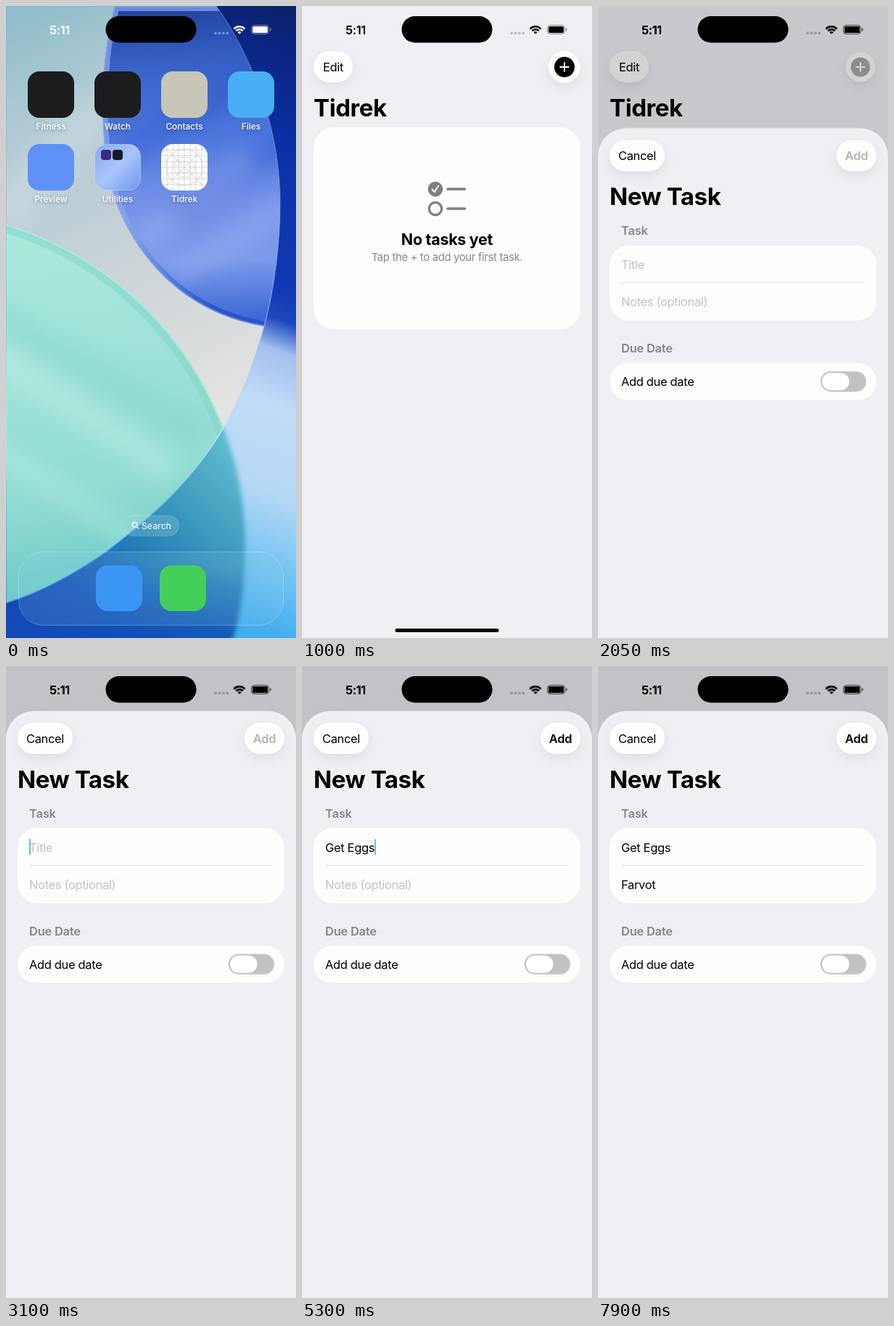
Recreate the animation shown at these times as an HTML page with a canvas. Size 400x870 px, loop 8 s.

```html
<!DOCTYPE html>
<html lang="en">
<head>
<meta charset="utf-8">
<title>Task app</title>
<style>
  html, body { margin: 0; width: 100%; height: 100%; overflow: hidden; background: #f0eff4; }
  canvas { display: block; width: 400px; height: 870px; }
</style>
</head>
<body>
<canvas id="stage"></canvas>
<script>
const W = 400, H = 870, LOOP = 8000, STEP = 50;
const APP = 'Tidrek';
const dpr = window.devicePixelRatio || 1;
const stage = document.getElementById('stage');
let c;

const clamp = v => Math.max(0, Math.min(1, v));
const lerp = (a, b, p) => a + (b - a) * p;

// Critically damped spring, settled from `end` on.
function spring(t, start, end, stiffness) {
  if (t <= start) return 0;
  if (t >= end) return 1;
  const x = (t - start) / 1000 * stiffness;
  return 1 - (1 + x) * Math.exp(-x);
}

function setup(canvas) {
  canvas.width = W * dpr;
  canvas.height = H * dpr;
  const ctx = canvas.getContext('2d');
  ctx.scale(dpr, dpr);
  return ctx;
}

function layer(draw) {
  const canvas = document.createElement('canvas');
  c = setup(canvas);
  draw();
  return canvas;
}

function group(draw) {
  c.save();
  draw();
  c.restore();
}

function box(x, y, w, h, r, fill, stroke) {
  c.beginPath();
  c.roundRect(x, y, w, h, r);
  if (fill) { c.fillStyle = fill; c.fill(); }
  if (stroke) { c.strokeStyle = stroke; c.stroke(); }
}

function disc(x, y, r, fill) {
  c.beginPath();
  c.arc(x, y, r, 0, 7);
  c.fillStyle = fill;
  c.fill();
}

function rim(x, y, r, color, width) {
  c.beginPath();
  c.arc(x, y, r - width / 2, 0, 7);
  c.strokeStyle = color;
  c.lineWidth = width;
  c.stroke();
}

function line(points, color, width) {
  c.beginPath();
  points.forEach(([x, y]) => c.lineTo(x, y));
  c.strokeStyle = color;
  c.lineWidth = width;
  c.stroke();
}

function strokePath(path, color, width) {
  c.strokeStyle = color;
  c.lineWidth = width;
  c.stroke(path);
}

function font(size, weight = 400, track = -0.021) {
  c.font = `${weight} ${size}px Inter, "Liberation Sans", sans-serif`;
  c.letterSpacing = size * track + 'px';
}

function text(s, x, y, size, color, { weight, track, align = 'left' } = {}) {
  font(size, weight, track);
  c.textAlign = align;
  c.fillStyle = color;
  c.fillText(s, x, y);
}

function gradient(x0, y0, x1, y1, ...colors) {
  const g = c.createLinearGradient(x0, y0, x1, y1);
  colors.forEach((color, i) => Array.isArray(color)
    ? g.addColorStop(color[0], color[1])
    : g.addColorStop(i / (colors.length - 1), color));
  return g;
}

function fillStage(fill) {
  c.fillStyle = fill;
  c.fillRect(0, 0, W, H);
}

// ---- Home screen ----

function streak(x0, y0, x1, y1, color, width) {
  group(() => {
    c.filter = `blur(${width * 0.4 * dpr}px)`;
    line([[x0, y0], [x1, y1]], color, width);
  });
}

function drawWallpaper() {
  fillStage(gradient(390, 0, 104, 766, '#0a2068', [.07, '#0a2580'], [.23, '#0c31a6'], [.45, '#1239b4'],
    [.5, '#1d48bd'], [.55, '#a3c0ee'], [.64, '#c3dbf7'], [.78, '#b4d8f6'], [.9, '#72c4f2'], [1, '#42aeee']));

  const mint = [-135, 745, 465];
  group(() => {
    c.filter = `blur(${3 * dpr}px)`;
    disc(...mint, gradient(330, 590, 40, 880, '#68c3d5', [.28, '#429fbf'], [.5, '#2582b8'],
      [.75, '#1858bb'], [1, '#1a46b4']));
    disc(...mint, gradient(0, 770, 0, H, 'rgba(16,76,184,0)', 'rgba(16,76,184,.75)'));
  });

  const lens = new Path2D('M290 0C340 70 378 170 378 270C378 390 345 505 299 582C250 665 185 715 140 750C90 785 45 808 0 822V0Z');
  group(() => {
    c.clip(lens);
    fillStage(gradient(20, 0, 290, 560, '#8fbdcb', [.25, '#b0cbd4'], [.55, '#c6d1d6'], [1, '#e4e3e1']));
    streak(-20, 300, 140, 130, 'rgba(225,232,235,.35)', 50);

    const petal = new Path2D('M150 0C125 90 128 225 160 290C195 365 260 425 357 441L420 445V0Z');
    group(() => {
      c.clip(petal);
      fillStage(gradient(250, 0, 270, 430, '#20439f', [.2, '#3a64ca'], [.42, '#4f78de'],
        [.62, '#7592e8'], [.82, '#7b9aea'], [1, '#3f69d6']));
      streak(150, 210, 400, 60, 'rgba(30,70,190,.25)', 40);
      streak(230, 290, 400, 180, 'rgba(40,80,200,.4)', 34);
      streak(180, 330, 340, 210, 'rgba(170,190,245,.35)', 36);
      streak(230, 370, 390, 280, 'rgba(160,185,245,.35)', 34);
      strokePath(petal, gradient(170, 290, 290, 410, 'rgba(140,168,238,.7)', 'rgba(36,80,200,.85)'), 14);
      strokePath(petal, 'rgba(140,172,245,.6)', 3);
    });

    disc(...mint, gradient(60, 310, 140, 810, '#a9e9da', [.35, '#a0e2d7'], [.7, '#93ddd2'], [1, '#6bc9c9']));
    group(() => {
      c.beginPath();
      c.arc(...mint, 0, 7);
      c.clip();
      streak(-20, 480, 230, 640, 'rgba(205,245,235,.35)', 40);
      streak(-20, 610, 190, 740, 'rgba(195,240,230,.3)', 34);
      streak(-20, 420, 270, 590, 'rgba(120,205,195,.3)', 36);
      rim(...mint, 'rgba(130,214,200,.5)', 12);
      rim(...mint, 'rgba(190,240,228,.7)', 2);
    });
  });
  strokePath(lens, gradient(0, 0, 0, H, 'rgba(90,140,230,.3)', [.5, 'rgba(140,180,250,.7)'],
    [.68, '#c5ecf8'], [.8, '#58b4f4'], [1, '#2a66d8']), 1.4);
}

function drawTemplateIcon(x, y) {
  box(x, y, 64, 64, 16, '#fdfdfd');
  group(() => {
    c.clip();
    c.translate(x + 32, y + 32);
    c.strokeStyle = '#c9c9cb';
    c.lineWidth = 0.7;
    c.beginPath();
    for (const d of [-24, -16, -8, 0, 8, 16, 24]) {
      c.moveTo(d, -32); c.lineTo(d, 32);
      c.moveTo(-32, d); c.lineTo(32, d);
    }
    c.moveTo(-32, -32); c.lineTo(32, 32);
    c.moveTo(32, -32); c.lineTo(-32, 32);
    for (const r of [8, 14, 25]) { c.moveTo(r, 0); c.arc(0, 0, r, 0, 7); }
    c.stroke();
  });
}

function drawHomeItems(withApp) {
  const icon = (x, y, color) => box(x, y, 64, 64, 16, color);
  icon(30, 90, '#1c1c1e');
  icon(122, 90, '#1c1c1e');
  icon(214, 90, '#c8c6b8');
  icon(306, 90, '#49aef3');
  icon(30, 190, '#5f90f6');

  c.lineWidth = 1;
  box(122.5, 190.5, 63, 63, 16, gradient(122, 190, 186, 254, '#86a9f2', '#a9c4fa', '#6f95ee'), 'rgba(200,220,255,.55)');
  box(131, 198, 14, 14, 4, '#3a2a78');
  box(147, 198, 14, 14, 4, '#151a26');
  if (withApp) drawTemplateIcon(214, 190);

  group(() => {
    c.shadowColor = 'rgba(0,0,0,.35)';
    c.shadowBlur = 4 * dpr;
    c.shadowOffsetY = dpr;
    const rows = [['Fitness', 'Watch', 'Contacts', 'Files'], ['Preview', 'Utilities', withApp ? APP : '']];
    rows.forEach((row, j) => row.forEach((label, i) =>
      text(label, 62 + 92 * i, 170 + 100 * j, 11.8, '#fff', { weight: 500, track: 0.005, align: 'center' })));
  });

  c.lineWidth = 1;
  box(162.5, 701.5, 76, 28, 14, 'rgba(160,205,212,.3)', 'rgba(255,255,255,.15)');
  const searchInk = 'rgba(255,255,255,.85)';
  rim(177.5, 714, 4, searchInk, 1.4);
  line([[180, 716.5], [183, 719.5]], searchInk, 1.4);
  text('Search', 187, 719.5, 12.2, searchInk, { weight: 500, track: 0 });

  c.lineWidth = 1;
  box(17.5, 751.5, 365, 101, 34, 'rgba(150,205,230,.16)', 'rgba(255,255,255,.25)');
  box(124, 770, 64, 63, 16, '#3a96f2');
  box(212, 770, 64, 63, 16, '#43cf59');
}

// ---- Shared chrome ----

function drawStatus(color, dots) {
  text('5:11', 74, 38.5, 16.5, color, { weight: 600, align: 'center' });
  for (let i = 0; i < 4; i++) disc(289 + 5.4 * i, 37.3, 1.9, dots);
  c.strokeStyle = color;
  for (const [r, w] of [[10.3, 2.5], [6.4, 2.4], [1.7, 3.4]]) {
    c.beginPath();
    c.arc(322, 38.6, r, -Math.PI * 0.76, -Math.PI * 0.24);
    c.lineWidth = w;
    c.stroke();
  }
  group(() => {
    c.globalAlpha *= 0.45;
    c.lineWidth = 1;
    box(338.5, 26.5, 24, 12, 4, null, color);
    box(364, 30.5, 1.4, 4, 0.7, color);
  });
  box(340, 28, 21, 9, 2.6, color);
}

const drawIsland = () => box(137.5, 14, 125, 36.5, 18.3, '#000');

function pill(x, y, w, h, fill) {
  group(() => {
    c.shadowColor = 'rgba(0,0,0,.07)';
    c.shadowBlur = 16 * dpr;
    c.shadowOffsetY = 6 * dpr;
    box(x, y, w, h, h / 2, fill);
  });
}

// ---- App ----

const bold = { weight: 700, track: -0.012 };

function drawApp(pressed) {
  fillStage('#f0eff4');
  drawStatus('#000', '#bcbcc0');

  pill(16, 62, 54, 43, '#fdfdfd');
  text('Edit', 43, 90, 16.5, '#000', { align: 'center' });
  const r = pressed ? 20.5 : 22;
  pill(362 - r, 84 - r, 2 * r, 2 * r, '#fdfdfd');
  disc(362, 84, pressed ? 13.3 : 14, pressed ? '#a9a9ac' : '#000');
  line([[355.5, 84], [368.5, 84]], '#fff', 2);
  line([[362, 77.5], [362, 90.5]], '#fff', 2);

  text(APP, 16, 151.5, 33, '#000', bold);
  box(16, 167, 368, 278, 28, '#fdfdfd');

  const gray = '#7f7f80';
  c.lineCap = 'round';
  disc(184, 252, 10.3, gray);
  line([[179.5, 252.5], [182.8, 256], [188.3, 247.5]], '#fff', 2);
  rim(184, 279, 10.3, gray, 3.3);
  for (const y of [252, 279]) line([[201, y], [224.5, y]], gray, 3.6);
  c.lineCap = 'butt';

  text('No tasks yet', 200, 328.5, 21.4, '#000', { ...bold, align: 'center' });
  text('Tap the + to add your first task.', 200, 350.5, 14.8, '#88888b', { align: 'center' });
}

// ---- New task sheet ----

const typing = [
  [0, '', ''],
  [4300, 'G', ''], [4400, 'Get', ''], [4450, 'Get ', ''], [4700, 'Get E', ''],
  [4900, 'Get Eg', ''], [4950, 'Get Egg', ''], [5000, 'Get Eggs', ''],
  [6550, 'Get Eggs', 'F'], [6900, 'Get Eggs', ''], [7100, 'Get Eggs', 'Fa'],
  [7200, 'Get Eggs', 'Far'], [7300, 'Get Eggs', 'Farv'], [7550, 'Get Eggs', 'Farvot'],
];

// Caret opacity as [time, value] knots.
const caret = [
  [2700, 0], [2750, 1], [3050, 1], [3300, 0], [3550, 0], [3850, 1], [4050, 1], [4250, 0], [4300, 1],
  [5250, 1], [5450, 0], [5500, 0], [5550, 1], [5800, 1], [5900, 0], [6000, 0], [6100, 1],
  [6300, 1], [6400, 0], [6500, 0], [6550, 1], [7800, 1], [7900, 0],
];

function caretAlpha(t) {
  const next = caret.findIndex(([time]) => time > t);
  if (next < 1) return 0;
  const [t0, a] = caret[next - 1], [t1, b] = caret[next];
  return lerp(a, b, (t - t0) / (t1 - t0));
}

function drawField(value, placeholder, y, caretOpacity) {
  text(value || placeholder, 32, y + 6, 16.5, value ? '#000' : '#c3c3c6');
  if (!caretOpacity) return;
  const x = 32 + c.measureText(value).width;
  group(() => {
    c.globalAlpha = caretOpacity;
    box(x, y - 11.5, 2, 22.5, 1, '#3ea2f7');
  });
}

function drawSheet(t) {
  const [, title, notes] = typing.findLast(([time]) => time <= t);
  const heading = { weight: 600, track: -0.015 };
  box(0, 62, W, H, [38, 38, 0, 0], '#f0eff4');

  pill(16, 78, 76, 43, '#fdfdfd');
  text('Cancel', 54, 106, 16.5, '#000', { align: 'center' });
  pill(329, 78, 55, 43, '#fdfdfd');
  text('Add', 356.5, 106, 16.5, title ? '#000' : '#b4b4b6', { weight: 600, align: 'center' });
  text('New Task', 16, 167.5, 33, '#000', bold);

  text('Task', 32, 209, 16.5, '#85858a', heading);
  box(16, 223, 368, 103.5, 27, '#fdfdfd');
  c.fillStyle = '#e0e0e2';
  c.fillRect(32, 274, 336, 1);
  const alpha = caretAlpha(t), onTitle = t < 5500;
  drawField(title, 'Title', 249.5, onTitle ? alpha : 0);
  drawField(notes, 'Notes (optional)', 300.5, onTitle ? 0 : alpha);

  text('Due Date', 32, 370.5, 16.5, '#85858a', heading);
  box(16, 385, 368, 51, 25.5, '#fdfdfd');
  text('Add due date', 32, 416.5, 16.5, '#000');
  box(307, 396.5, 63, 28, 14, '#c2c2c4');
  box(309, 398.5, 37.5, 24, 12, '#fff');
}

// ---- Scenes ----

const wallpaper = layer(drawWallpaper);
const homeItems = layer(() => drawHomeItems(true));
const homeItemsOpen = layer(() => drawHomeItems(false));

function drawHome(t) {
  const away = clamp((t - 500) / 100);
  const blur = radius => { if (away) c.filter = `blur(${radius * away * dpr}px)`; };
  c.drawImage(wallpaper, 0, 0, W, H);
  group(() => {
    blur(1.5);
    c.drawImage(wallpaper, 0, 0, W, H);
  });
  group(() => {
    const s = lerp(1, 0.987, away);
    c.translate(W / 2, H / 2);
    c.scale(s, s);
    blur(3);
    c.drawImage(t < 550 ? homeItems : homeItemsOpen, -W / 2, -H / 2, W, H);
  });
  if (t >= 500 && t < 550) box(214, 190, 64, 64, 16, 'rgba(0,0,0,.25)');
  fillStage(`rgba(30,30,30,${0.19 * away})`);
}

// The app window grows out of its icon: its centre leads, its pinched top edge trails.
function drawOpening(t, p) {
  const width = lerp(64, W, p), center = lerp(246, W / 2, p ** 0.87);
  const left = center - width / 2, right = center + width / 2;
  const bottom = lerp(254, H, p);
  const top = lerp(190, 0, clamp((p - 0.34) / 0.66));
  const pinch = 40 * p * (1 - p);
  const r = 16 + 46 * Math.sin(Math.PI * p), rTop = r * 0.85;
  const scale = width / W;
  group(() => {
    c.beginPath();
    c.moveTo(center, top);
    c.arcTo(right - pinch, top, right, bottom, rTop);
    c.arcTo(right, bottom, left, bottom, r);
    c.arcTo(left, bottom, left + pinch, top, r);
    c.arcTo(left + pinch, top, right, top, rTop);
    c.closePath();
    c.clip();
    fillStage('#f0eff4');
    group(() => {
      c.translate(left, top - 8 * (1 - p));
      c.scale(scale, scale);
      drawApp(false);
    });
    const barWidth = 143 * scale;
    box(center - barWidth / 2, bottom - 13 * scale, barWidth, 5 * scale, 3, p < 0.6 ? '#c4c4c8' : '#000');
    if (t < 600) {
      c.globalAlpha = 0.6;
      c.translate(left, top);
      c.scale(width / 64, (bottom - top) / 64);
      drawTemplateIcon(0, 0);
    }
  });
}

function render(t) {
  c.clearRect(0, 0, W, H);
  const open = spring(t, 510, 1000, 13.65);
  if (open < 1) {
    drawHome(t);
    if (open > 0) drawOpening(t, open);
    group(() => {
      c.globalAlpha = clamp((0.9 - open) / 0.4);
      drawStatus('#fff', t < 550 ? '#6d92dc' : '#8d9ec4');
    });
    drawIsland();
    return;
  }

  drawApp(t >= 1800);
  const barAlpha = clamp((1450 - t) / 150);
  if (barAlpha) box(128.5, 857, 143, 5, 2.5, `rgba(0,0,0,${barAlpha})`);

  const rise = spring(t, 1810, 2350, 14.75);
  if (rise) {
    fillStage(`rgba(0,0,0,${0.19 * rise})`);
    group(() => {
      c.translate(0, (1 - rise) * (H - 62));
      drawSheet(t);
    });
    drawStatus('#000', '#9c9c9f');
  }
  drawIsland();
}

c = setup(stage);
const start = performance.now();
function frame() {
  const t = (performance.now() - start) % LOOP;
  render(Math.floor(t / STEP) * STEP);
  requestAnimationFrame(frame);
}
frame();
</script>
</body>
</html>
```
